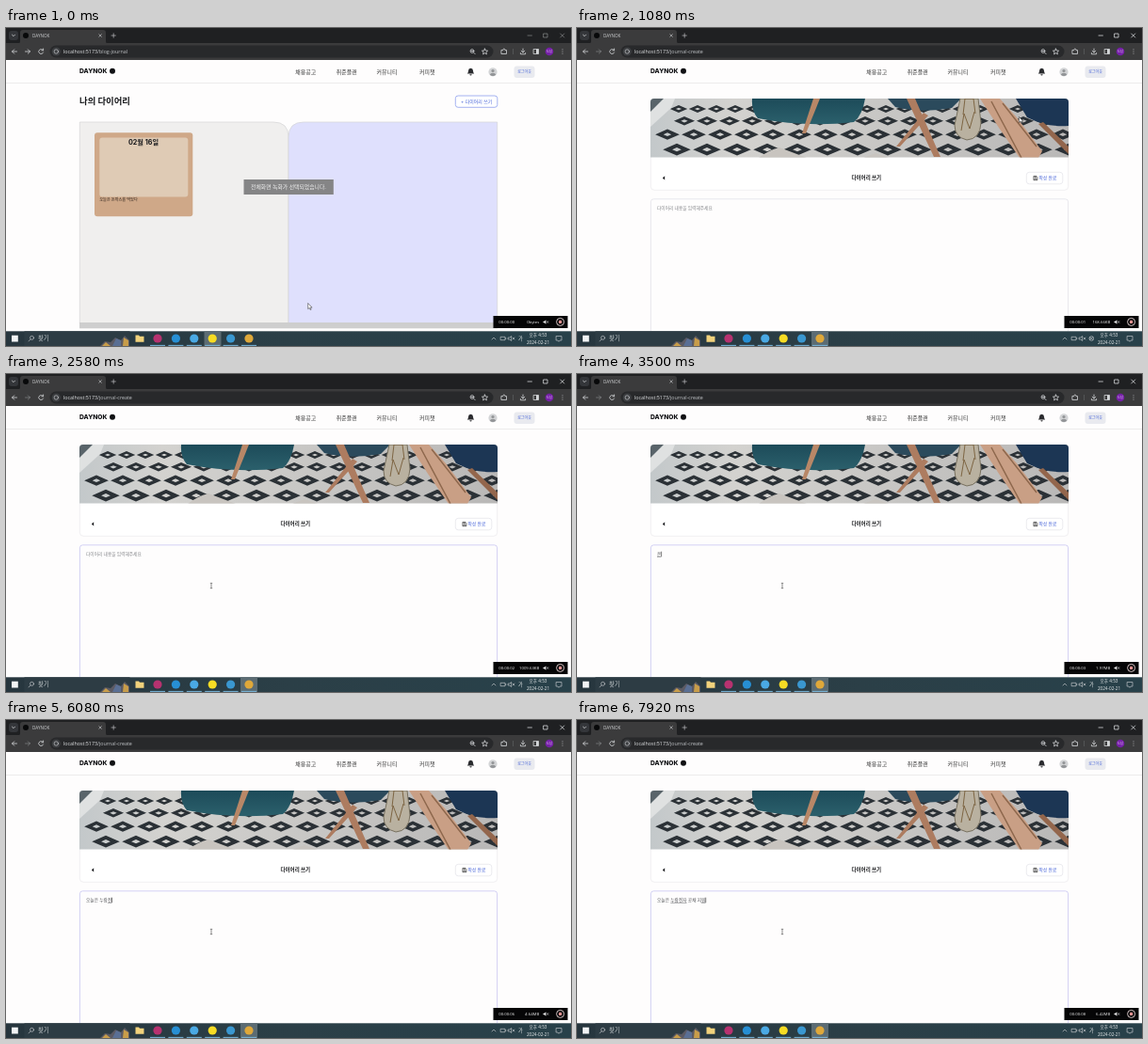
These frames come from a looping animation (600 px wide and 338 px high, 8000 ms). An HTML page:

```html
<!DOCTYPE html>
<html lang="ko">
<head>
<meta charset="utf-8">
<title>다이어리</title>
<style>
html, body { margin: 0; width: 100%; height: 100%; overflow: hidden; background: #fefdfd; }
svg { display: block; width: 100vw; height: 100vh; }
text { font-family: Inter, 'Noto Sans CJK KR', 'Noto Sans CJK JP', 'Noto Sans CJK', sans-serif; white-space: pre; }
.ui { font-family: 'Open Sans', 'Noto Sans CJK KR', 'Noto Sans CJK JP', 'Noto Sans CJK', sans-serif; }
.line { fill: none; stroke: #d4d6d8; stroke-width: .8; stroke-linecap: round; stroke-linejoin: round; }
.thin { stroke-width: .6; }
.mid { text-anchor: middle; }
.end { text-anchor: end; }
.bold { font-weight: 700; }
</style>
</head>
<body>
<svg id="stage" viewBox="0 0 600 338">
  <defs>
    <clipPath id="photoClip"><path d="M78 137.5V79q0-4 4-4H518q4 0 4 4V137.5Z"/></clipPath>
    <clipPath id="page"><rect y="34" width="600" height="288"/></clipPath>
    <linearGradient id="floor"><stop stop-color="#c3c8ca"/><stop offset=".2" stop-color="#d3d2cf"/><stop offset="1" stop-color="#b9b8b7"/></linearGradient>
    <linearGradient id="sofa" x2="0" y2="1"><stop stop-color="#1d4b59"/><stop offset="1" stop-color="#2b606c"/></linearGradient>
    <linearGradient id="bar"><stop stop-color="#27363e"/><stop offset=".5" stop-color="#2b3f47"/><stop offset="1" stop-color="#28414a"/></linearGradient>
  </defs>
  <rect width="600" height="338" fill="#fefdfd"/>

  <!-- browser frame -->
  <rect width="600" height="17" fill="#1f2022"/>
  <rect x="3" y="3" width="10" height="10" rx="3" fill="#34363a"/>
  <path class="line" d="M6.5 7.2L8 8.7 9.5 7.2"/>
  <path d="M12 17q3 0 3-3V5q0-3 3-3H103q3 0 3 3v9q0 3 3 3Z" fill="#3b3b3c"/>
  <circle cx="21" cy="8" r="3" fill="#08090a"/>
  <text class="ui" x="28" y="10" font-size="4.6" fill="#d0d2d4">DAYNOK</text>
  <path class="line thin" d="M98.8 6.7l2.600 2.600m0-2.600l-2.600 2.600M112 8h4.400M114.200 5.800v4.400"/>
  <path id="controls" class="line" d="M554 8h4.400M571 6h4v4h-4ZM588.700 6l4 4m0-4l-4 4"/>
  <rect y="16" width="600" height="18" fill="#3b3b3c"/>
  <path class="line" d="M11.500 25h-5m2.200-2.200L6.500 25l2.200 2.200M39.300 23.500a2.500 2.500 0 1 0 .3 2.500M39.600 22v1.800h-1.800"/>
  <path id="forward" class="line" d="M20.500 25h5m-2.200-2.200l2.200 2.200-2.200 2.200"/>
  <rect x="46.500" y="18.500" width="471" height="13" rx="6.500" fill="#28292b"/>
  <circle cx="53.300" cy="25" r="4.600" fill="#3d3f42"/>
  <circle class="line thin" cx="53.300" cy="25" r="2.200"/>
  <text class="ui" x="61" y="27" font-size="5.350" fill="#e2e4e6">localhost:5173<tspan id="path" fill="#c2c5c8"></tspan></text>
  <circle class="line" cx="495" cy="24.500" r="1.900"/>
  <path class="line" d="M496.500 26l1.600 1.600M494.200 24.500h1.600"/>
  <path class="line" d="M508.500 22l.9 2 2.200.2-1.700 1.500.5 2.200-1.900-1.200-1.900 1.200.5-2.200-1.700-1.500 2.200-.2Z"/>
  <path class="line" d="M526.300 23.500h1.600q0-1.500 1-1.500t1 1.500h1.600v4h-5.200ZM549 22v4m-1.800-1.700L549 26l1.800-1.700M546.400 26.500v1.300h5.200v-1.300M560.500 22.500h5v5h-5Z"/>
  <path d="M538.500 22v6" stroke="#66686b" stroke-width=".6"/>
  <rect x="563" y="22.500" width="2.500" height="5" fill="#d4d6d8"/>
  <circle cx="577" cy="25" r="4.300" fill="#7620a8"/>
  <text class="ui mid" x="577" y="26.300" font-size="3.200" fill="#e9d3f4">도담</text>
  <path class="line" d="M591 22.800v0M591 25v0M591 27.200v0" stroke-width="1.100"/>

  <g clip-path="url(#page)">
    <!-- site header -->
    <path d="M0 58.500H600" stroke="#e8e7e8" stroke-width=".8"/>
    <text x="78" y="48.300" font-size="6.700" font-weight="800" fill="#101114">DAYNOK</text>
    <circle cx="113" cy="45.700" r="3" fill="#101114"/>
    <g font-size="5.950" fill="#333">
      <text x="307.300" y="48.500">채용공고</text><text x="350.800" y="48.500">취준플랜</text>
      <text x="393.500" y="48.500">커뮤니티</text><text x="439" y="48.500">커피챗</text>
    </g>
    <path d="M489.800 48.500q1.200-1 1.200-3 0-2.600 2.500-2.800 2.500.2 2.500 2.800 0 2 1.200 3ZM492.300 49.200h2.400q-.2 1.200-1.200 1.200t-1.200-1.200Z" fill="#2a2b2e"/>
    <circle cx="517" cy="46.800" r="4.600" fill="#d3d4d6"/>
    <circle cx="517" cy="45.500" r="1.600" fill="#929497"/>
    <path d="M513.800 49.700q.5-2 3.200-2t3.200 2q-3.200 2.500-6.400 0Z" fill="#929497"/>
    <rect x="539.500" y="40.500" width="22" height="12.500" rx="3" fill="#e9eaef"/>
    <text class="mid" x="550.500" y="48.200" font-size="4" font-weight="500" fill="#4562d8">로그아웃</text>

    <!-- diary list -->
    <g id="list">
      <text class="bold" x="78" y="81" font-size="9.400" fill="#17181b">나의 다이어리</text>
      <rect x="477.300" y="72" width="44.500" height="12.300" rx="2.800" fill="#fff" stroke="#8ea0ee" stroke-width=".8"/>
      <text class="mid" x="499.700" y="80" font-size="4.950" fill="#4562d8">+ 다이어리 쓰기</text>
      <g stroke="#d5d5d6" stroke-width=".7">
        <path id="left" d="M78.300 314V100H284q16 0 16 16V314Z"/>
        <path id="right" d="M521.700 314V100H316q-16 0-16 16V314Z"/>
      </g>
      <rect x="78" y="313" width="444" height="6.300" fill="#cecece"/>
      <rect x="94" y="111.300" width="104.300" height="89" rx="3" fill="#cfa888"/>
      <rect x="99.300" y="116.600" width="94" height="63" rx="3" fill="#dfcbb5"/>
      <text class="mid bold" x="146" y="124" font-size="7.200" fill="#17181b">02월 16일</text>
      <text x="99.300" y="183.600" font-size="4.150" fill="#2b211b">오늘은 돈까스를 먹었다</text>
    </g>

    <!-- diary editor -->
    <g id="editor">
      <rect x="78.300" y="75.300" width="443.400" height="97" rx="4" fill="#fff" stroke="#e6e5e8" stroke-width=".6"/>
      <g clip-path="url(#photoClip)">
        <rect x="78" y="75" width="444" height="63" fill="url(#floor)"/>
        <path id="rug" fill="#2b3136"/>
        <path d="M78 75h26l-4 10-22 20Z" fill="#dfe1e1"/>
        <path d="M78 75h14l-14 14Z" fill="#59646a"/>
        <path d="M186 75H306q-3 18-12 25-50 6-102-4-7-8-6-21Z" fill="url(#sofa)"/>
        <path d="M251 75h7l-15 37h-4Z" fill="#b88767"/>
        <path d="M330 75H408l-10 10q-32 6-60-1Z" fill="#2b4a5c"/>
        <path d="M350 75h9l27 62h-7ZM368 90l5 3-30 33h-4Z" fill="#ad7c60"/>
        <path d="M466 75h56v29q-22 2-44-9Z" fill="#1c3654"/>
        <path d="M490 102l5-2 27 26v8Z" fill="#93664c"/>
        <path d="M193 138q10-8 22-11l29 11ZM304 138l13-5 14 5Z" fill="#c8c4bf"/>
        <path d="M428 75h21l18 20 27 36-4 7h-20l-22-32Z" fill="#c99f85"/>
        <path d="M440 78l32 60M452 80l36 46" stroke="#8e684d" stroke-width="1.500"/>
        <path d="M407 75h19l3 26q-1 17-15 18-13-3-13-16Z" fill="#b9b1a0" stroke="#77705f" stroke-width="1"/>
        <path d="M408 109l3-18 6 16 5-18M410 92l2-17h9l2 16" fill="none" stroke="#7d6543" stroke-width="1"/>
      </g>
      <path d="M93.200 157.300v4.200l-2.300-2.100Z" fill="#17181b"/>
      <text class="mid bold" x="307.300" y="161.300" font-size="5.500" fill="#17181b">다이어리 쓰기</text>
      <rect x="477.300" y="153.300" width="38.500" height="12.500" rx="3" fill="#fff" stroke="#e2e3e9" stroke-width=".7"/>
      <path d="M484.900 157.400h3l1 1v3.300h-4ZM485.900 157.400v1.400h1.600v-1.400M485.900 161.700v-1.600h2v1.600" fill="none" stroke="#222" stroke-width=".6"/>
      <text x="490.400" y="161.200" font-size="4.800" fill="#4562d8">작성 완료</text>
      <rect id="box" x="78.400" y="181.800" width="443.200" height="160" rx="3" fill="#fefdfd" stroke-width=".7"/>
      <text id="hint" x="85" y="193" font-size="4.700" fill="#85868a">다이어리 내용을 입력해주세요</text>
      <text id="typed" x="85" y="193" font-size="4.700" fill="#55565a"></text>
      <path id="marks" fill="none" stroke="#55565a" stroke-width=".5"/>
      <path id="caret" stroke="#222" stroke-width=".6"/>
    </g>
  </g>

  <g id="toast">
    <rect x="252.500" y="161" width="95.300" height="16" fill="#858586"/>
    <text class="ui mid" x="300" y="171.200" font-size="5.850" fill="#f2f2f2">전체화면 녹화가 선택되었습니다.</text>
  </g>

  <!-- taskbar -->
  <rect y="322.300" width="600" height="16" fill="url(#bar)"/>
  <rect x="6" y="326.700" width="6.800" height="6.800" fill="#f2f4f5"/>
  <rect x="19.500" y="322.300" width="112" height="16" fill="#2d3c44"/>
  <circle class="line thin" cx="27.500" cy="329.300" r="2"/>
  <path class="line thin" d="M26 330.900l-2 2"/>
  <text class="ui" x="34" y="332.300" font-size="6.300" fill="#c6ccce">찾기</text>
  <path d="M100 338l5-5 6 1 5-5 6 3 4-5 5 5v6Z" fill="#5c5a63"/>
  <path d="M102 338l4-4 5 4ZM125 329l5 3v6h-6Z" fill="#c89d4a"/>
  <path d="M113 338l4-8 5 2v6Z" fill="#5a6f94"/>
  <path d="M137.500 326.500h3.500l1 1.200h4.500v6h-9Z" fill="#f1d27c"/>
  <rect id="active" y="322.300" width="18" height="16" fill="#5c6c73"/>
  <g id="apps"></g>
  <path class="line thin" d="M516 331l2-2 2 2M525.500 328.300h4.500v3.400h-4.500ZM530.700 329.300v1.400M533.500 329h1.400l1.700-1.500v5l-1.700-1.500h-1.400ZM538 329l2 2m0-2l-2 2"/>
  <text class="ui mid" id="ime" x="546.300" y="332" font-size="5.200" fill="#e3e6e7">가</text>
  <path id="noIme" class="line thin" d="M544 330a2.300 2.300 0 1 0 4.600 0a2.300 2.300 0 1 0-4.600 0M544.700 328.400l3.200 3.200m0-3.200l-3.200 3.200"/>
  <g font-size="4.650" fill="#eef0f1">
    <text class="ui mid" x="565" y="328.300">오후 4:53</text><text class="ui mid" x="565" y="335.700">2024-02-21</text>
  </g>
  <path class="line thin" d="M584.500 327.500h5.500v4.500h-2l-1 1.300-1-1.300h-1.500Z"/>

  <!-- recorder -->
  <rect x="517.500" y="306" width="79" height="13" fill="#050506"/>
  <text class="ui" id="clock" x="523.300" y="314.200" font-size="4.250" fill="#f4f4f4"></text>
  <text class="ui end" id="size" x="566.300" y="314.200" font-size="4.300" fill="#f4f4f4"></text>
  <path d="M570.500 311.700h1.300l1.500-1.400v4.400l-1.500-1.400h-1.300Z" fill="#f4f4f4"/>
  <path class="line thin" d="M574.300 311.600l1.600 1.800m0-1.800l-1.600 1.800"/>
  <circle cx="588.600" cy="312.400" r="4" fill="none" stroke="#ead9d8" stroke-width=".9"/>
  <rect x="587" y="310.800" width="3.200" height="3.200" rx=".6" fill="#dd8f8e"/>

  <path id="arrow" d="M0 0v6.200l1.500-1.300 1 2.200.9-.4-1-2.100h2Z" fill="#fff" stroke="#222" stroke-width=".5"/>
  <path id="beam" d="M-1.200-2.700h2.400M0-2.700v5.400M-1.200 2.700h2.400" fill="none" stroke="#444" stroke-width=".6"/>
</svg>
<script>
const $ = id => document.getElementById(id);
const LOOP = 8000, CLICK = 790, NAV = 900, FOCUS = 1750, IME_ON = 1900;
const KB = 1024, MB = KB * KB;

// each word: time of first key, gap between keys, what stands after each key
const words = [
  [3150, 150, 'ㅇ 오 온 오느 오늘 오늘ㅇ 오늘으 오늘은'],
  [4750, 180, 'ㄴ 누 눌 누라 누람 누람ㅈ 누람저 누람전 누람전ㅈ 누람전자'],
  [6600, 120, 'ㄱ 고 공 공ㅊ 공채'],
  [7280, 100, 'ㅈ 지 징 지우 지워 지원']
].map(([at, gap, keys]) => ({ at, gap, keys: keys.split(' ') }));

const sizes = [[0, 0], [1, 80], [4, 505.81 * KB], [7, 1.97 * MB], [9, 3.16 * MB], [12, 4.64 * MB], [16, 6.42 * MB]];
const moves = [[0, 320.7, 292.5], [90, 320.7, 292.5], [490, 455.6, 97.2], [750, 499, 79], [950, 499, 79], [1600, 218, 225]];

const attr = (id, name, value) => $(id).setAttribute(name, value);
const show = (id, on) => attr(id, 'visibility', on ? 'visible' : 'hidden');
const mix = (a, b, p) => a + (b - a) * p;
const ease = p => p * p * (3 - 2 * p);

function track(keys, x, curve = p => p) {
  const i = keys.findIndex(k => k[0] > x);
  if (i < 0) return keys[keys.length - 1].slice(1);
  const [a, b] = [keys[i - 1], keys[i]];
  const p = curve((x - a[0]) / (b[0] - a[0]));
  return a.slice(1).map((v, n) => mix(v, b[n + 1], p));
}

function bytes(b) {
  if (b < KB) return Math.round(b) + 'bytes';
  return b < MB ? (b / KB).toFixed(2) + 'KB' : (b / MB).toFixed(2) + 'MB';
}

function typing(t) {
  let text = '', last = FOCUS, open = false;
  words.forEach(({ at, gap, keys }, i) => {
    if (t < at) return;
    const n = Math.min(keys.length - 1, Math.floor((t - at) / gap));
    const space = at + (keys.length - 1) * gap + 130;
    open = t < space || i === words.length - 1;
    text += keys[n] + (open ? '' : '\u00a0');
    last = open ? at + n * gap : space;
  });
  return { text, last, open };
}

function drawEditor(t) {
  const { text, last, open } = typing(t);
  const el = $('typed');
  el.textContent = text;
  show('hint', !text);
  const x = 85 + (text ? el.getComputedTextLength() : 0);
  let d = '';
  const under = (from, count) => {
    const a = 85 + (from ? el.getSubStringLength(0, from) : 0);
    d += `M${a} 194.4h${el.getSubStringLength(from, count)}`;
  };
  if (open) under(text.length - 1, 1);
  if (text.length > 8) under(4, 4); // spelling mark below the second word
  attr('marks', 'd', d);
  attr('caret', 'd', `M${x + .3} 188.7v5.5`);
  show('caret', t >= FOCUS && (t - last) % 1000 < 500);
  const p = Math.max(0, Math.min(1, (t - FOCUS) / 200));
  attr('box', 'stroke', `rgb(${mix(222, 192, p)},${mix(222, 189, p)},${mix(229, 240, p)})`);
}

function drawPointer(t) {
  const [x, y] = track(moves, t, ease);
  const beam = t >= NAV && y > 182 && x > 78 && x < 522;
  const over = x0 => x > x0 && x < x0 + 222 && y > 100 && y < 313;
  const fill = on => on ? '#dfe0fd' : '#f0efee';
  attr('left', 'fill', fill(over(78)));
  attr('right', 'fill', fill(over(300)));
  for (const id of ['arrow', 'beam']) attr(id, 'transform', `translate(${x} ${y})`);
  show('arrow', !beam);
  show('beam', beam);
}

function draw(t) {
  const focused = t >= CLICK, editing = t >= NAV;
  const ime = !focused || t >= IME_ON;
  $('list').style.display = editing ? 'none' : '';
  $('editor').style.display = editing ? '' : 'none';
  $('path').textContent = editing ? '/journal-create' : '/blog-journal';
  attr('controls', 'opacity', focused ? 1 : .5);
  attr('forward', 'opacity', editing ? .4 : 1);
  attr('active', 'x', focused ? 249 : 210.5);
  show('ime', ime);
  show('noIme', !ime);
  show('toast', t < 160);

  const tick = Math.floor((t + 170) / 500);
  $('clock').textContent = '00:00:0' + (tick >> 1);
  $('size').textContent = bytes(track(sizes, tick)[0]);

  if (editing) drawEditor(t);
  drawPointer(t);
}

function build() {
  // rows of diamonds that grow towards the viewer
  let rug = '';
  for (let row = 0; row < 4; row++) {
    const y = 86 + row * 12 + row * row * .8, w = 20 + row * 4, h = 4 + row * .8;
    for (let x = 108 - row * 6 + row % 2 * w / 2; x < 530; x += w) {
      const r = w * .46;
      rug += `M${x - r} ${y}l${r}-${h} ${r} ${h}-${r} ${h}Z`;
      rug += `M${x - r / 3} ${y}l${r / 3}-${h / 3} ${r / 3} ${h / 3}-${r / 3} ${h / 3}Z`;
    }
  }
  attr('rug', 'd', rug);
  attr('rug', 'fill-rule', 'evenodd');

  const colors = ['#b73270', '#278fd4', '#4aa9e4', '#f7dc24', '#3a97d0', '#dfa83a'];
  $('apps').innerHTML = colors.map((color, i) => {
    const x = 161 + i * 19.4;
    return `<circle cx="${x}" cy="330" r="4.6" fill="${color}"/>` +
      `<path d="M${x - 8} 337.4h16" stroke="#79b7dd" stroke-width="1"/>`;
  }).join('');
}

build();
const start = performance.now();
function frame() {
  draw((performance.now() - start) % LOOP);
  requestAnimationFrame(frame);
}
frame();
</script>
</body>
</html>
```
